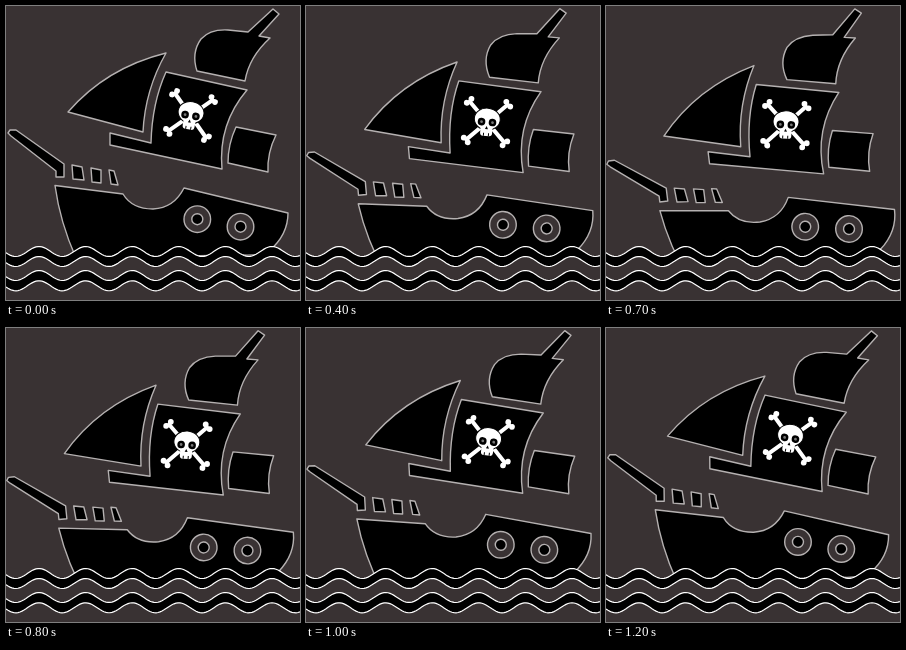
An HTML page that plays this animation: 294 by 294 pixels, repeating every 1.3 s.

```html
<!DOCTYPE html>
<html lang="en">
<head>
<meta charset="utf-8">
<title>Rocking pirate ship</title>
<style>
  html, body { margin: 0; width: 100%; height: 100%; overflow: hidden; background: #393233; }
  svg { display: block; width: 100vw; height: 100vh; }
  .outlined { fill: #000; stroke: #b5b1b1; stroke-width: 1.4; stroke-linejoin: round; }
  .ring { fill: #393233; }
  .bone { fill: none; stroke: #fff; stroke-width: 4; stroke-linecap: round; }
</style>
</head>
<body>
<svg viewBox="0 0 294 294">
  <rect width="294" height="294" fill="#393233"/>
  <g id="ship">
    <g class="outlined">
      <path d="M62 106Q100 62 160 47Q139 84 137 126Z"/>
      <path d="M160 66L241 84Q212 118 216 163L104 139L104 127L145 137Q146 97 160 66Z"/>
      <path d="M230 121L270 129Q261 147 262 166L222 157Q222 138 230 121Z"/>
      <path d="M191 65Q185 47 195 33Q204 23 222 24L242 26L267 3L273 8L253 30L264 32Q243 51 239 75Z"/>
      <path d="M2 127L4 124L10 124L58 158L58 171L50 171L50 165L5 130Z"/>
      <path d="M66 159L76 161L78 174L67 173Z"/>
      <path d="M85 162L95 164L95 177L86 176Z"/>
      <path d="M103 164L108 165L112 179L105 178Z"/>
      <path d="M49 179.500L117 188Q126 203 147 203Q168 202 178 182L282 207Q282 229 263 245Q254 250 235 249L70 252Q54 216 49 179.500Z"/>
      <g id="portholes"></g>
    </g>
    <g transform="translate(184.500 109.500) rotate(10)">
      <g id="bones"></g>
      <ellipse cy="-3" rx="13" ry="11" fill="#fff" stroke="#000"/>
      <rect x="-6" y="3" width="12" height="11" rx="3" fill="#fff"/>
      <circle cx="-5.500" cy="0" r="3.800"/>
      <circle cx="5.500" cy="0" r="3.800"/>
      <circle cx="-5.500" cy="0" r="1.400" fill="#777"/>
      <circle cx="5.500" cy="0" r="1.400" fill="#777"/>
      <path d="M0 4L-1.500 7H1.500Z"/>
      <path d="M-2.500 11V14M2.500 11V14" stroke="#000"/>
    </g>
  </g>
  <g id="waves" stroke="#fff" stroke-width="1.200"></g>
</svg>
<script>
const SVG_NS = 'http://www.w3.org/2000/svg';
const byId = id => document.getElementById(id);

function add(parent, tag, attributes) {
  const node = document.createElementNS(SVG_NS, tag);
  for (const name in attributes) node.setAttribute(name, attributes[name]);
  parent.append(node);
}

for (const [cx, cy] of [[191.3, 213.2], [234.5, 220.7]]) {
  add(byId('portholes'), 'circle', { cx, cy, r: 13.3, class: 'ring' });
  add(byId('portholes'), 'circle', { cx, cy, r: 5.5 });
}

// Each diagonal bone has a two-lobed knob at both ends.
for (const side of [-1, 1]) {
  const bones = byId('bones');
  add(bones, 'path', { class: 'bone', d: `M${-19 * side} -19L${19 * side} 19` });
  for (const end of [-1, 1]) {
    const x = 19.5 * side * end, y = 19.5 * end;
    add(bones, 'circle', { cx: x + 2.3 * side * end, cy: y - 2 * end, r: 2.9, fill: '#fff' });
    add(bones, 'circle', { cx: x - 2 * side * end, cy: y + 2.3 * end, r: 2.9, fill: '#fff' });
  }
}

// Fill everything below a wavy edge, hiding whatever lies behind it.
function addWave(middle, fill) {
  let d = 'M-4 300';
  for (let x = -4; x <= 298; x += 2) {
    const y = middle - 5 * Math.cos((x - 33) / 46.6 * 2 * Math.PI);
    d += `L${x} ${y.toFixed(2)}`;
  }
  add(byId('waves'), 'path', { d: d + 'L298 300Z', fill });
}
addWave(245.5, '#000');
addWave(255.5, '#393233');
addWave(269.5, '#000');
addWave(279.8, '#393233');

const LOOP = 1300, STEP = 100, DEGREES_PER_STEP = 1.27;
const start = performance.now();

function draw(now) {
  const step = Math.floor((Math.max(0, now - start) % LOOP) / STEP);
  const swing = Math.min(step, 12.5 - step);
  byId('ship').setAttribute('transform', `rotate(${-DEGREES_PER_STEP * swing} 257 152)`);
  requestAnimationFrame(draw);
}
draw(start);
</script>
</body>
</html>
```
